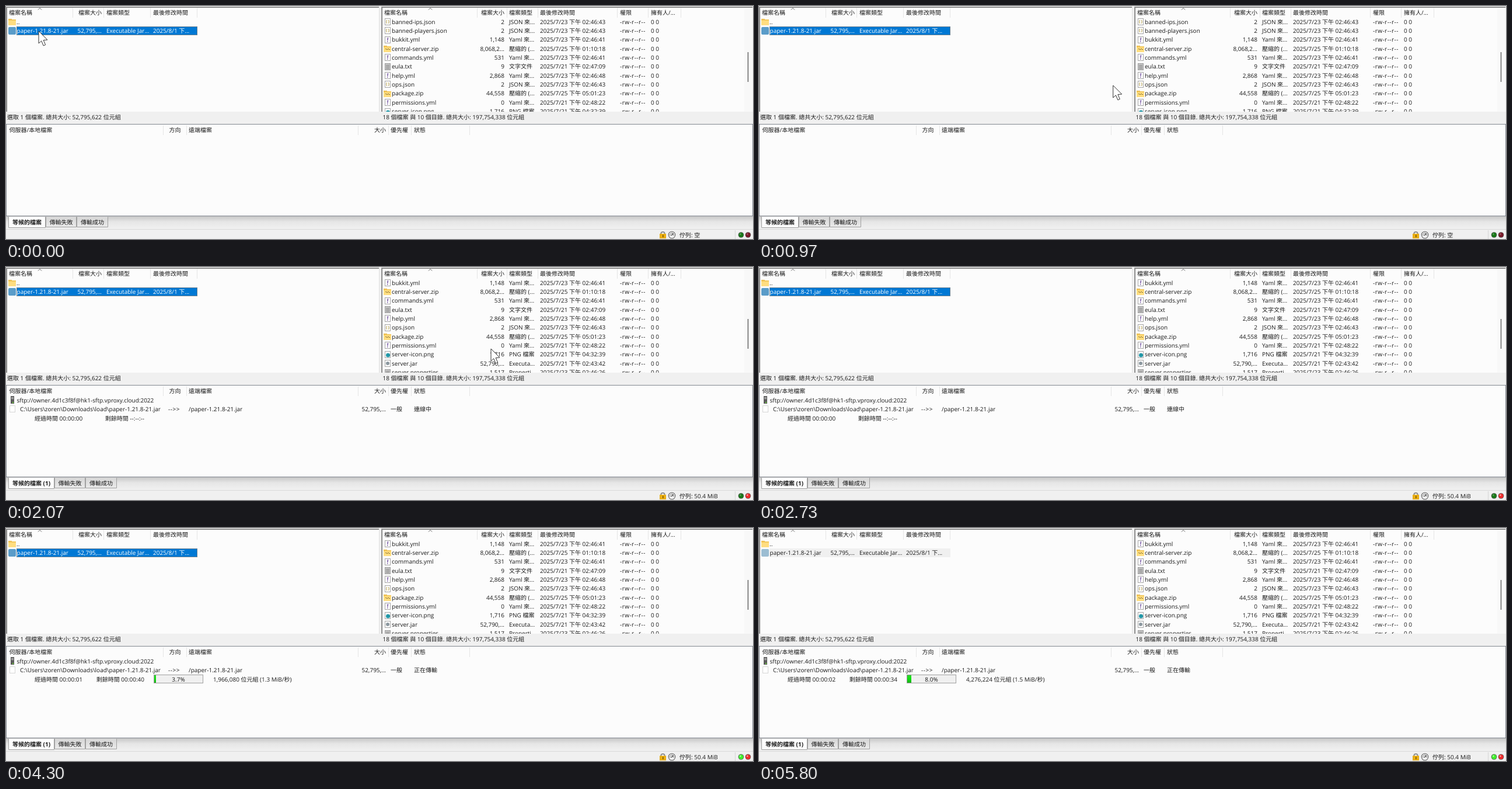
Animation of 1280 by 399 pixels, one loop 5830 ms. Source, as an HTML page with a canvas:

```html
<!DOCTYPE html>
<html lang="zh-Hant">
<head>
<meta charset="utf-8">
<title>檔案傳輸</title>
<style>
  html, body { margin: 0; width: 100%; height: 100%; overflow: hidden; background: #f0f0f0; }
  canvas { display: block; }
</style>
</head>
<body>
<canvas id="stage" width="1280" height="399"></canvas>
<script>
const ctx = document.getElementById('stage').getContext('2d');
const LOOP = 5830;
const FONT = '10px "Open Sans", "Noto Sans CJK TC", "Noto Sans CJK", sans-serif';
const INK = '#1a1a1a', PAPER = '#fcfcfc', FACE = '#f0f0f0', EDGE = '#828790', BLUE = '#0078d4';
const ROW = 15.35, TOTAL = 52795622;
const DROP = 1650, START = 3150, BLUR = 5350;

// name, size, type, day in July 2025, time, icon
const files = [
  ['banned-ips.json', '2', 'JSON 來...', 23, '02:46:43', 'json'],
  ['banned-players.json', '2', 'JSON 來...', 23, '02:46:43', 'json'],
  ['bukkit.yml', '1,148', 'Yaml 來...', 23, '02:46:41', 'yml'],
  ['central-server.zip', '8,068,2...', '壓縮的 (...', 25, '01:10:18', 'zip'],
  ['commands.yml', '531', 'Yaml 來...', 23, '02:46:41', 'yml'],
  ['eula.txt', '9', '文字文件', 21, '02:47:09', 'txt'],
  ['help.yml', '2,868', 'Yaml 來...', 23, '02:46:48', 'yml'],
  ['ops.json', '2', 'JSON 來...', 23, '02:46:43', 'json'],
  ['package.zip', '44,558', '壓縮的 (...', 25, '05:01:23', 'zip'],
  ['permissions.yml', '0', 'Yaml 來...', 21, '02:48:22', 'yml'],
  ['server-icon.png', '1,716', 'PNG 檔案', 21, '04:32:39', 'png'],
  ['server.jar', '52,790,...', 'Executa...', 21, '02:43:42', 'jar'],
  ['server.properties', '1,517', 'Properti...', 23, '02:46:26', 'txt']
];

// time, x, y of the pointer tip
const path = [
  [0, 56, 43], [530, 59, 40], [640, 72, 42], [1140, 800, 170], [1300, 807, 157],
  [DROP, 818, 149], [2000, 831, 140], [2200, 831, 140], [2560, 872, -40]
];

function rect(x, y, w, h, color) {
  ctx.fillStyle = color;
  ctx.fillRect(x, y, w, h);
}

function frame(x, y, w, h, color) {
  ctx.strokeStyle = color;
  ctx.lineWidth = 1;
  ctx.strokeRect(x + 0.5, y + 0.5, w - 1, h - 1);
}

function circle(x, y, r, color) {
  ctx.fillStyle = color;
  ctx.beginPath();
  ctx.arc(x, y, r, 0, 7);
  ctx.fill();
}

function line(points, color, width = 1) {
  ctx.strokeStyle = color;
  ctx.lineWidth = width;
  ctx.beginPath();
  points.forEach(([x, y]) => ctx.lineTo(x, y));
  ctx.stroke();
}

function text(str, x, cy, { align = 'left', color = INK, bold = false, gap = 0 } = {}) {
  ctx.font = (bold ? 'bold ' : '') + FONT;
  ctx.textRendering = 'geometricPrecision';
  ctx.textAlign = align;
  ctx.letterSpacing = gap + 'px';
  ctx.fillStyle = color;
  ctx.fillText(str, x, cy + 3.6);
}

const right = { align: 'right' }, center = { align: 'center' };

// List area with a sunken edge on the top and left
function sunken(x, y, w, h) {
  rect(x, y, w, h, PAPER);
  rect(x, y, w, 1, '#a0a0a0');
  rect(x, y, 1, h, '#a0a0a0');
  rect(x + 1, y + 1, w - 1, 1, '#7c7c7c');
  rect(x + 1, y + 1, 1, h - 1, '#7c7c7c');
  rect(x + w - 1, y, 1, h, '#e3e3e3');
}

function dividers(xs, y) {
  xs.forEach(x => rect(x, y, 1, 17, '#e5e5e5'));
}

function caret(x) {
  line([[x - 3, 6.5], [x, 3.5], [x + 3, 6.5]], '#666');
}

function page(x, cy) {
  rect(x, cy - 6, 10, 12, '#fff');
  frame(x, cy - 6, 10, 12, '#a5a5a5');
}

function folder(x, cy) {
  rect(x, cy - 5, 6, 3, '#eab744');
  rect(x, cy - 4, 13, 10, '#f3c95f');
  rect(x, cy - 2, 13, 8, '#ffdd80');
}

const icons = {
  json(x, cy) {
    page(x, cy);
    line([[x + 4, cy - 3], [x + 3, cy - 2], [x + 3, cy + 2], [x + 4, cy + 3]], '#b09a45');
    line([[x + 6, cy - 3], [x + 7, cy - 2], [x + 7, cy + 2], [x + 6, cy + 3]], '#b09a45');
  },
  yml(x, cy) {
    page(x, cy);
    line([[x + 5.5, cy - 4], [x + 4.8, cy + 1]], '#6b4a9c', 1.4);
    rect(x + 4, cy + 2, 1.5, 1.5, '#6b4a9c');
  },
  txt(x, cy) {
    rect(x, cy - 6, 10, 12, '#c8c8c8');
    frame(x, cy - 6, 10, 12, '#9a9a9a');
    for (let i = -3; i < 5; i += 2) rect(x + 2, cy + i, 6, 1, '#8c8c8c');
  },
  zip(x, cy) {
    folder(x - 2, cy);
    for (let i = 0; i < 4; i++) rect(x + 1 + i * 2, cy + (i % 2), 2, 1, '#8d742f');
  },
  png(x, cy) {
    page(x, cy);
    circle(x + 5.5, cy + 1, 3.5, '#2298a8');
  },
  jar(x, cy) {
    page(x, cy);
    circle(x + 5, cy, 3, '#8b979f');
  }
};

function localPane(t) {
  sunken(0, 1, 640, 180);
  dividers([114, 167, 247, 327], 3);
  caret(58);
  text('檔案名稱', 5, 11.5);
  text('檔案大小', 164, 11.5, right);
  text('檔案類型', 172, 11.5);
  text('最後修改時間', 252, 11.5);

  folder(4, 27);
  text('..', 18, 27);

  const active = t < BLUR, color = active ? '#fff' : INK;
  rect(18, 35, 310, 15, active ? BLUE : FACE);
  if (active) {
    ctx.setLineDash([1, 1]);
    frame(18, 35, 310, 15, '#d08a50');
    ctx.setLineDash([]);
  }
  ctx.fillStyle = active ? '#5a9cc9' : '#9bbdd2';
  ctx.beginPath();
  ctx.roundRect(4, 36, 13, 13, 2);
  ctx.fill();
  text('paper-1.21.8-21.jar', 18.5, 42.5, { color });
  text('52,795,...', 164, 42.5, { color, align: 'right' });
  text('Executable Jar...', 172, 42.5, { color });
  text('2025/8/1 下...', 252, 42.5, { color });
  text('選取 1 個檔案. 總共大小: 52,795,622 位元組', 2, 190);
}

function remotePane(t) {
  const first = t < 1120 ? 0 : t < 1220 ? 1 : 2;
  sunken(643, 1, 637, 180);
  dividers([807, 858, 911, 1047, 1100, 1156], 3);
  caret(727);
  text('檔案名稱', 648, 11.5);
  text('檔案大小', 854, 11.5, right);
  text('檔案類型', 862, 11.5);
  text('最後修改時間', 915, 11.5);
  text('權限', 1052, 11.5);
  text('擁有人/...', 1105, 11.5);

  ctx.save();
  ctx.beginPath();
  ctx.rect(645, 19, 620, 162);
  ctx.clip();
  files.slice(first, first + 11).forEach(([name, size, type, day, time, icon], i) => {
    const cy = 27 + i * ROW;
    icons[icon](649, Math.round(cy));
    text(name, 661, cy);
    text(size, 854, cy, right);
    text(type, 862, cy);
    text(`2025/7/${day} 下午 ${time}`, 915, cy);
    text('-rw-r--r--', 1052, cy, { gap: 0.45 });
    text('0 0', 1105, cy);
  });
  ctx.restore();

  rect(1265, 3, 15, 178, '#f8f8f8');
  rect(1270.5, 79 + first * 5, 2, 51, '#858585');
  text('18 個檔案 與 10 個目錄. 總共大小: 197,754,338 位元組', 645.5, 190);
}

function transfer(t) {
  const running = t >= START;
  rect(8, 221, 6, 13, '#5c5c5c');
  rect(9, 223, 4, 1, '#d0d0d0');
  rect(9, 225, 4, 1, '#d0d0d0');
  rect(11, 231, 2, 2, '#67c23a');
  text('sftp://owner.4d1c3f8f@hk1-sftp.vproxy.cloud:2022', 18.5, 228);

  rect(6, 237, 10, 12, '#fff');
  frame(6, 237, 10, 12, '#d6d6d6');
  text('C:\\Users\\zoren\\Downloads\\load\\paper-1.21.8-21.jar', 24, 243.5);
  text('-->>', 278, 243.5, { gap: 0.5 });
  text('/paper-1.21.8-21.jar', 313, 243.5);
  text('52,795,...', 651, 243.5, right);
  text('一般', 659, 243.5);
  text(running ? '正在傳輸' : '連線中', 699, 243.5);

  const secs = running ? Math.floor((t - START) / 1000) : 0;
  const left = secs ? '00:00:' + Math.round(40 - (t - 4300) / 250) : '--:--:--';
  text('經過時間 00:00:0' + secs, 49, 259);
  text('剩餘時間 ' + left, 237, 259, right);
  if (!running) return;

  const bytes = sent(t);
  const share = bytes / TOTAL;
  const speed = secs ? (1.3 + Math.max(0, t - 4300) * 0.2 / 1500).toFixed(1) + ' MiB' : '? B';
  rect(253, 251, 85, 15, '#f0f0f0');
  const fill = Math.floor(83 * share + 0.4);
  const green = ctx.createLinearGradient(0, 252, 0, 265);
  green.addColorStop(0, '#2fd32f');
  green.addColorStop(0.5, '#0ee00e');
  green.addColorStop(1, '#1cae1c');
  if (fill > 1) rect(254, 252, fill, 13, green);
  frame(253, 251, 85, 15, '#a0a0a0');
  text((Math.floor(share * 1000) / 10).toFixed(1) + '%', 295.5, 259, center);
  text(`${bytes.toLocaleString('en-US')} 位元組 (${speed}/秒)`, 355, 259);
}

// Bytes so far, refreshed in short ticks and whole 16 KiB blocks
function sent(t) {
  const tick = t >= 5800 ? 5800 : START + 20 + Math.floor((t - START - 20) / 100) * 100;
  const k = Math.max(START, tick);
  const blocks = k <= 3370 ? 22 * (k - START) / 220
    : k <= 4270 ? 22 + 98 * (k - 3370) / 900
    : 120 + 141 * (k - 4270) / 1530;
  return Math.round(blocks) * 16384;
}

function queuePane(t) {
  rect(0, 202, 1280, 158, PAPER);
  frame(0, 202, 1280, 158, EDGE);
  dividers([269, 309, 603, 655, 694, 794], 204);
  text('伺服器/本地檔案', 5.5, 212.5);
  text('方向', 289.5, 212.5, center);
  text('遠端檔案', 313, 212.5);
  text('大小', 651, 212.5, right);
  text('優先權', 659, 212.5);
  text('狀態', 699, 212.5);
  if (t >= DROP) transfer(t);
}

function tab(x, w, label, bold) {
  const h = bold ? 19 : 18;
  const shade = ctx.createLinearGradient(0, 361, 0, 380);
  shade.addColorStop(0, bold ? '#fff' : '#d6d6d6');
  shade.addColorStop(1, bold ? '#fafafa' : '#ececec');
  rect(x, 361, w, h, shade);
  line([[x + 0.5, 361], [x + 0.5, 360.5 + h], [x + w - 0.5, 360.5 + h], [x + w - 0.5, 361]], '#a0a0a0');
  text(label, x + w / 2, 370.5, { align: 'center', bold });
}

function led(x, on, bright, dark) {
  circle(x, 392, 4.8, '#555');
  circle(x, 392, 4, on ? bright : dark);
  circle(x - 1.2, 390.6, 1.2, on ? 'rgba(255,255,255,.7)' : 'rgba(255,255,255,.35)');
}

function bottom(t) {
  const queued = t >= DROP;
  const strip = ctx.createLinearGradient(0, 360, 0, 381);
  strip.addColorStop(0, '#c6c6c6');
  strip.addColorStop(0.45, '#e6e6e6');
  strip.addColorStop(1, FACE);
  rect(0, 360, 1280, 21, strip);
  const first = queued ? 79 : 64;
  tab(4, first, queued ? '等候的檔案 (1)' : '等候的檔案', true);
  tab(4 + first, 53, '傳輸失敗', false);
  tab(57 + first, 54, '傳輸成功', false);

  rect(0, 382, 1280, 1, '#d9d9d9');
  ctx.strokeStyle = '#8a8a8a';
  ctx.lineWidth = 1.8;
  ctx.beginPath();
  ctx.arc(1125.5, 390, 3.2, Math.PI, 0);
  ctx.stroke();
  rect(1120, 390, 11, 8, '#e9ae14');
  rect(1125, 392, 1.5, 4, '#6f5207');

  circle(1141, 392, 6.3, '#666');
  circle(1141, 392, 5.2, '#f2f2f2');
  ctx.strokeStyle = '#777';
  ctx.lineWidth = 1;
  ctx.beginPath();
  ctx.arc(1141, 392, 3.3, 2.6, 6.8);
  ctx.stroke();
  line([[1140, 393], [1143.5, 389.5]], '#333', 1.3);

  text(queued ? '佇列: 50.4 MiB' : '佇列: 空', 1154, 392);
  rect(1249, 384, 1, 15, '#d5d5d5');
  led(1259.5, t >= 2800, '#3ff02c', '#197a19');
  led(1271.5, t >= 1900, '#f02c2c', '#7a1a2a');
}

function tip(t) {
  const i = path.findIndex(p => p[0] > t);
  if (i < 0) return null;
  const [t0, x0, y0] = path[i - 1], [t1, x1, y1] = path[i];
  const u = (t - t0) / (t1 - t0), e = u * u * (3 - 2 * u);
  return [x0 + (x1 - x0) * e, y0 + (y1 - y0) * e];
}

function pointer(t) {
  const at = tip(t);
  if (!at) return;
  const copying = at[0] > 643 && t < DROP;
  ctx.save();
  ctx.translate(...at);
  ctx.save();
  if (copying) ctx.scale(1.1, 1.1);
  ctx.beginPath();
  [[0, 0], [0, 21], [4.7, 16.8], [8.2, 25], [11.6, 23.5], [8.2, 15.5], [15, 15]]
    .forEach(p => ctx.lineTo(...p));
  ctx.closePath();
  ctx.fillStyle = '#fff';
  ctx.strokeStyle = copying ? '#111' : '#333';
  ctx.lineWidth = copying ? 1.7 : 1;
  ctx.fill();
  ctx.stroke();
  ctx.restore();
  if (copying) {
    rect(14, 28, 11, 11, '#111');
    rect(15, 29, 9, 9, '#fff');
    rect(16.5, 32.8, 6, 1.5, '#111');
    rect(18.8, 30.5, 1.5, 6, '#111');
  }
  ctx.restore();
}

function draw(t) {
  rect(0, 0, 1280, 399, FACE);
  localPane(t);
  remotePane(t);
  queuePane(t);
  bottom(t);
  pointer(t);
}

const began = performance.now();
function tick() {
  draw((performance.now() - began) % LOOP);
  requestAnimationFrame(tick);
}
tick();
</script>
</body>
</html>
```
